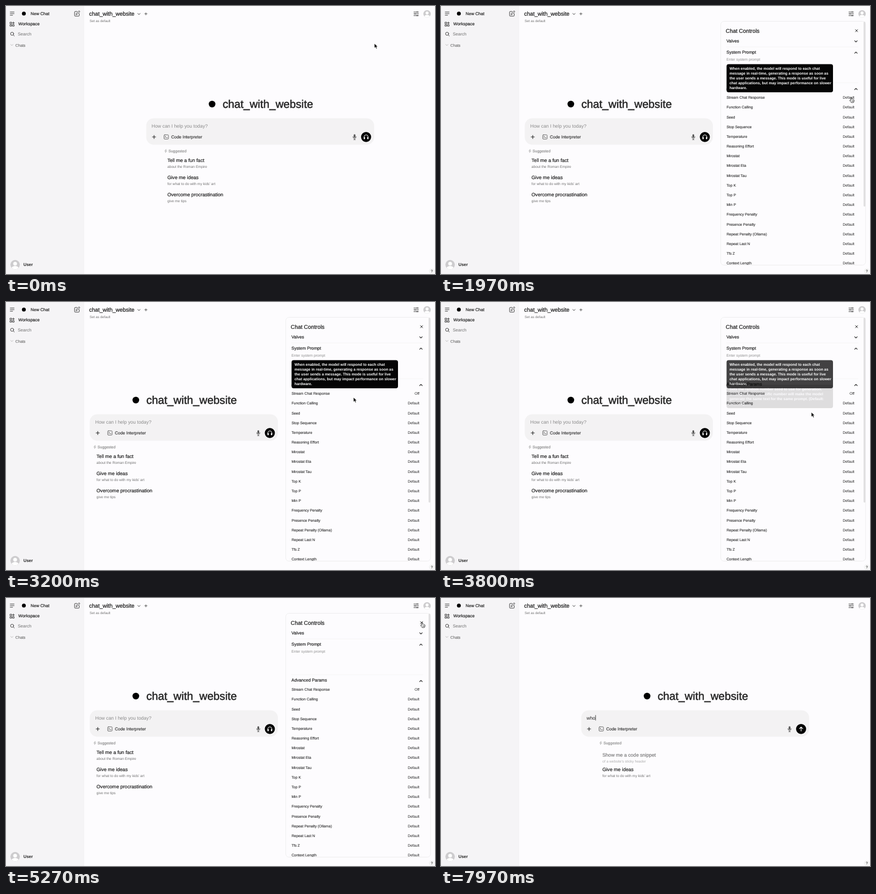
Write an HTML page that moves like this. It is 800 by 500 pixels and loops after 8000 ms.

```html
<!DOCTYPE html>
<html lang="en">
<head>
<meta charset="utf-8">
<title>Chat controls</title>
<style>
  html, body { margin: 0; width: 100%; height: 100%; overflow: hidden; background: #fdfcfe; }
  svg { display: block; width: 800px; height: 500px; }
  text { font-family: "Liberation Sans", Arial, sans-serif; text-rendering: geometricPrecision; fill: currentColor; white-space: pre; }
  .medium { stroke: currentColor; stroke-width: .026em; }
  .bold { font-weight: bold; }
  .line { fill: none; stroke: currentColor; stroke-width: .95; stroke-linecap: round; stroke-linejoin: round; }
</style>
</head>
<body>
<svg id="stage" viewBox="0 0 800 500"></svg>
<script>
const LOOP = 8000, OPEN = 830, CLOSE = 5600, TYPE = 7700, FILTER = 7902;
const INK = '#222', SOFT = '#707070', FAINT = '#8b8b8b';

const label = (x, y, size, str, color = INK, cls = '', extra = '') =>
  `<text x="${x}" y="${y}" font-size="${size}" class="${cls}" style="color:${color}" ${extra}>${str}</text>`;
const medium = (x, y, size, str, color = INK) => label(x, y, size, str, color, 'medium');
const line = (d, color = INK, width = .95) =>
  `<path class="line" d="${d}" style="color:${color};stroke-width:${width}"/>`;
const box = (x, y, w, h, r, fill, extra = '') =>
  `<rect x="${x}" y="${y}" width="${w}" height="${h}" rx="${r}" fill="${fill}" ${extra}/>`;
const disc = (x, y, r, fill) => `<circle cx="${x}" cy="${y}" r="${r}" fill="${fill}"/>`;
const group = (id, body, extra = '') => `<g id="${id}" ${extra}>${body}</g>`;
const chevron = (x, y, up) => line(`M${x - 2.3} ${y + (up ? 1.2 : -1.2)}l2.3 ${up ? -2.4 : 2.4}l2.3 ${up ? 2.4 : -2.4}`, INK, 1.2);

const avatar = (x, y, r) => `<g transform="translate(${x} ${y}) scale(${r})">
  ${disc(0, 0, 1, '#cdccce')}${disc(0, -.22, .4, '#fff')}
  <path d="M-.72 .68C-.6 .12 .6 .12 .72 .68A1 1 0 0 1-.72 .68Z" fill="#fff"/></g>`;

const suggestion = (id, y, title, sub) =>
  group(id, medium(301, y, 9.1, title) + label(301, y + 10.9, 6.67, sub, SOFT));

const sidebar = () => box(0, 0, 146, 500, 0, '#f5f4f6')
  + line('M7.8 11.2h7.4M7.8 14.2h7.4M7.8 17.2h4.6', '#333')
  + disc(33.3, 14.2, 3.6, '#000')
  + medium(46, 16.8, 7.95, 'New Chat')
  + line('M132.5 10.2h-3.4q-1.2 0-1.2 1.2v6.3q0 1.2 1.2 1.2h6.3q1.2 0 1.2-1.2v-3.5M130.8 16l.5-2.2l4.5-4.5q1.6-.4 1.8 1.4l-4.6 4.6z', '#333')
  + line('M7.8 30.2h2.8v2.8h-2.8zM7.8 34.8h2.8v2.8h-2.8zM12.4 34.8h2.8v2.8h-2.8zM13.8 29.7v3.8M11.9 31.6h3.8', '#333')
  + medium(23, 36.3, 7.98, 'Workspace')
  + '<circle class="line" cx="11.4" cy="51.8" r="2.9" style="color:#333"/>' + line('M13.6 54l2 2', '#333')
  + label(22, 55, 8, 'Search', SOFT)
  + line('M8.8 71.7l2.1 2.1l2.1-2.1', '#aaa', .8)
  + medium(17.5, 75.5, 7.15, 'Chats', '#737373')
  + avatar(17, 482.6, 8.8) + label(32.5, 485.4, 7.9, 'User', INK, 'bold');

const header = () => medium(155, 18, 10.35, 'chat_with_website')
  + line('M245.7 13.8l2.2 2.2l2.2-2.2', '#333') + line('M258.6 14.6h4.6M260.9 12.3v4.6', '#333', .8)
  + label(156, 30.2, 6.32, 'Set as default', SOFT)
  + box(754.5, 4.5, 20.5, 20.5, 5, '#f1f0f1', 'id="hover"')
  + line('M760.5 11.3h5.2M767.8 11.3h1.6M760.5 14.6h1.4M764 14.6h5.4M760.5 17.9h5.2M767.8 17.9h1.6', '#333')
  + [[766.8, 11.3], [762.9, 14.6], [766.8, 17.9]].map(([x, y]) => disc(x, y, 1.15, '#444')).join('')
  + avatar(785.2, 14.6, 6.9)
  + '<circle cx="794" cy="494.6" r="4.8" fill="#f6f6f6" stroke="#e6e6e6" stroke-width=".5"/>'
  + label(794, 497, 6.6, '?', '#444', 'medium', 'text-anchor="middle"');

const composer = () => group('title', disc(384.3, 183, 6.2, '#000') + medium(404, 189.9, 20.65, 'chat_with_website', '#262626'))
  + box(261.5, 209.5, 425, 49.3, 14, '#f3f2f3', 'id="pill"')
  + group('tools', label(271.5, 226.8, 8.9, 'How can I help you today?', FAINT, '', 'id="hint"')
    + label(271.5, 226.8, 8.9, '', INK, '', 'id="typed"')
    + box(271.5, 218.5, .8, 10, 0, '#111', 'id="caret"')
    + line('M273 244.3h6.2M276.1 241.2v6.2', '#222', 1.1)
    + line('M296 240.3h5.6q1.3 0 1.3 1.3v5.4q0 1.3-1.3 1.3h-5.6q-1.3 0-1.3-1.3v-5.4q0-1.3 1.3-1.3zM296.4 242.6l1.7 1.4l-1.7 1.4M299 245.6h1.8', '#444', .8)
    + medium(308, 247.2, 7.95, 'Code Interpreter', '#3a3a3a'))
  + group('actions', box(648.4, 239.2, 3.2, 6.6, 1.6, '#555')
    + line('M646.9 243.6q0 3.6 3.1 3.6t3.1-3.6M650 247.4v2M648.4 249.4h3.2', '#444', .8)
    + disc(671.5, 244.3, 9.4, '#000')
    + group('phones', line('M667.7 246v-1.8a3.8 3.8 0 0 1 7.6 0v1.8', '#fff', 1)
      + box(667.1, 244.6, 2.3, 3.8, .7, '#fff') + box(673.6, 244.6, 2.3, 3.8, .7, '#fff'))
    + group('send', line('M671.5 248.2v-7.4M668.3 243.8l3.2-3.2l3.2 3.2', '#fff', 1.2)));

const suggestions = () => group('list',
  line('M298.4 267.6l-2.5 3.3h2l-.6 2.6l2.7-3.4h-2z', '#999', .6)
  + medium(303, 272.9, 7.02, 'Suggested', FAINT)
  + suggestion('fact', 291.4, 'Tell me a fun fact', 'about the Roman Empire')
  + suggestion('snippet', 296.4 - 5, 'Show me a code snippet', "of a website's sticky header")
  + suggestion('ideas', 323.2, 'Give me ideas', "for what to do with my kids' art")
  + suggestion('overcome', 355, 'Overcome procrastination', 'give me tips'));

const params = ['Stream Chat Response', 'Function Calling', 'Seed', 'Stop Sequence', 'Temperature', 'Reasoning Effort',
  'Mirostat', 'Mirostat Eta', 'Mirostat Tau', 'Top K', 'Top P', 'Min P', 'Frequency Penalty', 'Presence Penalty',
  'Repeat Penalty (Ollama)', 'Repeat Last N', 'Tfs Z', 'Context Length'];

const row = (name, i) => {
  const y = 173.2 + i * 18.18;
  return label(532.4, y, 6.88, name, INK, 'medium', 'stroke-opacity=".5"')
    + label(771, y, 6.88, 'Default', INK, '', `text-anchor="end" ${i ? '' : 'id="stream"'}`);
};

const tooltip = (id, y, lines) => group(id,
  box(532.5, y, 198.5, lines.length * 9.08 + 7, 4, '#050505')
  + lines.map((s, i) => label(538, y + 10.5 + i * 9.08, 6.95, s, '#fff', 'bold')).join(''));

const panel = () => group('panel',
  box(521.7, 28.6, 270, 454.8, 6, '#fdfcfe', 'stroke="#e9e8e9" stroke-width=".7"')
  + medium(531, 49.6, 10.3, 'Chat Controls') + line('M772.8 43.9l4.2 4.2M777 43.9l-4.2 4.2', INK, 1)
  + medium(532.3, 67.9, 8.05, 'Valves') + chevron(773.8, 66, false)
  + line('M532 76.4h246M532 143.2h246', '#f0eff0', .6)
  + medium(532.3, 88.8, 8.1, 'System Prompt') + chevron(773.8, 87, true)
  + label(532.3, 102.3, 6.82, 'Enter system prompt', FAINT)
  + medium(532.3, 156.4, 8.1, 'Advanced Params') + chevron(773.8, 154.8, true)
  + group('rows', params.map(row).join(''), 'clip-path="url(#clip)"')
  + box(788, 29.2, 3.5, 345, 1.7, '#e1e0e1', 'id="scrollbar"')
  + tooltip('streamTip', 108.5, ['When enabled, the model will respond to each chat',
    'message in real-time, generating a response as soon as', 'the user sends a message. This mode is useful for live',
    'chat applications, but may impact performance on slower', 'hardware.'])
  + tooltip('seedTip', 154.6, ['Sets the random number seed to use for generation.',
    'Setting this to a specific number will make the model', 'generate the same text for the same prompt. (Default:', 'random)']));

const pointers = () => group('pointer',
  group('arrow', '<path d="M0 0v8.4l2-1.8l1.5 3.2l1.5-.7l-1.5-3.1h2.7z" fill="#000" stroke="#fff" stroke-width=".6"/>')
  + group('hand', '<path d="M-.9 .9q.9-1.6 1.8 0v3l.4-.1q1.1-.5 1.4.4q1.1-.3 1.4.5q1.1-.1 1.2 1v1.8q-.2 1.6-1.1 2.6h-4.2q-1-1.6-2.4-3.2q-.8-1.2.2-1.5q.7-.1 1.3.8z" fill="#fff" stroke="#111" stroke-width=".8" stroke-linejoin="round"/>'
    + line('M1.2 6.4v2M2.6 6.4v2M3.9 6.4v2', '#111', .5))
  + group('beam', line('M-1.4-4.6q1.4 0 1.4 1v7.2q0 1-1.4 1M1.4-4.6q-1.4 0-1.4 1v7.2q0 1 1.4 1', '#111', .8)));

const stage = document.getElementById('stage');
stage.innerHTML = '<clipPath id="clip"><rect x="522" y="160" width="269" height="323"/></clipPath>'
  + sidebar() + header() + composer() + suggestions() + panel() + pointers();
const el = {};
stage.querySelectorAll('[id]').forEach(node => el[node.id] = node);

// time, x, y, eased
const path = [[0, 687, 70], [30, 687, 70], [600, 766, 18, 1], [1170, 766, 18], [1640, 765, 170, 1], [3070, 765, 170],
  [3200, 648, 178, 1], [3700, 648, 178], [3800, 690, 206], [3880, 742, 188], [3970, 773, 153], [4160, 786, 96],
  [4330, 793, 54], [4500, 795, 27], [4800, 791, 30], [5270, 776, 45, 1], [6170, 776, 45], [6930, 389, 225, 1],
  [6990, 389, 225], [7000, 391, 225]];
const handTimes = [[430, 1230], [1580, 3095], [3930, 4010], [5120, 5670]];
// time, opacity
const streamFade = [[0, 0], [1690, 0], [1960, 1], [2000, 1], [2150, .3], [2330, .78], [2420, 1], [2670, 1],
  [2760, .6], [2900, 1], [3740, 1], [3970, .07, 1], [4020, 0]];
const seedFade = [[0, 0], [3770, 0], [3860, .35], [3970, .13], [4030, 0]];

const smooth = p => p * p * (3 - 2 * p);
function sample(keys, t) {
  const i = keys.findIndex(k => k[0] > t);
  if (i < 0) return keys[keys.length - 1].slice(1);
  const a = keys[i - 1], b = keys[i];
  let p = (t - a[0]) / (b[0] - a[0]);
  if (b[b.length - 1] === 1 && b.length === 4) p = smooth(p);
  return a.slice(1, 3).map((v, j) => v + (b[j + 1] - v) * p);
}
const within = (t, ranges) => ranges.some(([a, b]) => t >= a && t < b);
const show = (node, on) => node.style.display = on ? '' : 'none';
const shift = (node, x, y = 0) => node.setAttribute('transform', `translate(${x} ${y})`);

function draw(t) {
  const open = t >= OPEN && t < CLOSE, typing = t >= TYPE, filtered = t >= FILTER;
  const [x, y] = sample(path, t);

  show(el.panel, open);
  shift(el.title, open ? -142.2 : 0);
  shift(el.tools, open ? -105 : 0);
  shift(el.actions, open ? -179.5 : 0);
  shift(el.list, open ? -132.2 : 0);
  el.pill.setAttribute('x', open ? 156.2 : 261.5);
  el.pill.setAttribute('width', open ? 350.8 : 425);
  show(el.scrollbar, x < 792 && y > 28.5);
  show(el.hover, x > 754 && x < 775 && y < 25);
  el.stream.textContent = t < 2000 ? 'Default' : t < 2670 ? 'On' : 'Off';
  el.streamTip.style.opacity = sample(streamFade, t)[0];
  el.seedTip.style.opacity = sample(seedFade, t)[0];

  el.typed.textContent = typing ? 'who'.slice(0, t < 7800 ? 1 : t < FILTER ? 2 : 3) : '';
  show(el.hint, !typing);
  show(el.phones, !typing);
  show(el.send, typing);
  show(el.caret, within(t, [[6930, 7430], [TYPE, LOOP]]));
  el.caret.setAttribute('x', 271.5 + (typing ? el.typed.getComputedTextLength() : 0));

  show(el.fact, !filtered);
  show(el.overcome, !filtered);
  show(el.snippet, filtered);
  const rise = 1 - Math.pow(1 - Math.min(1, Math.max(0, (t - FILTER) / 200)), 2);
  el.snippet.style.opacity = rise;
  shift(el.snippet, 0, 11.1 * (1 - rise));

  const hand = within(t, handTimes), beam = t > 6820;
  show(el.pointer, !typing);
  show(el.hand, hand);
  show(el.beam, beam);
  show(el.arrow, !hand && !beam);
  shift(el.pointer, x, y);
}

function tick() {
  draw(performance.now() % LOOP);
  requestAnimationFrame(tick);
}
tick();
</script>
</body>
</html>
```
